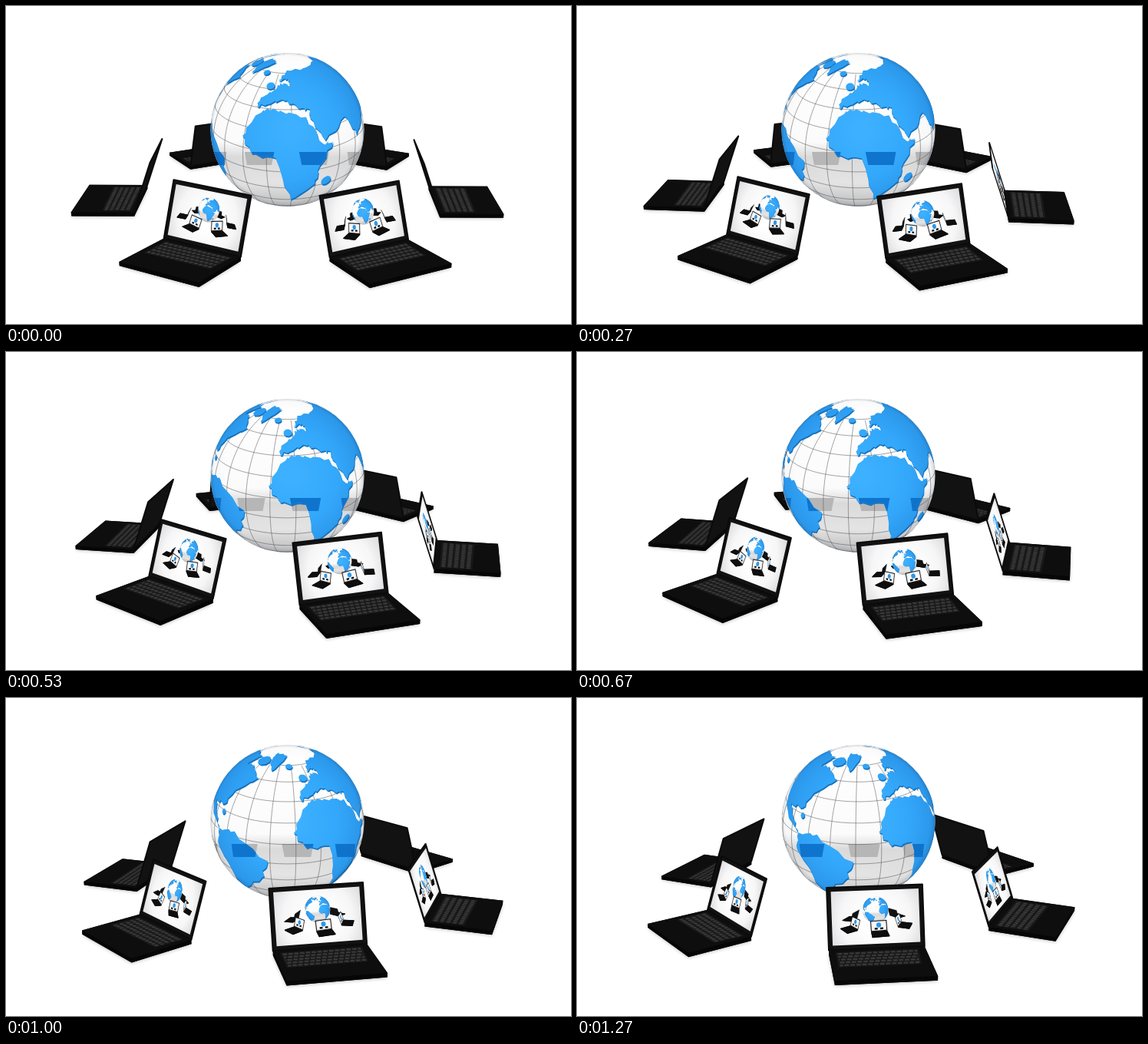
These frames come from a looping animation (736 px wide and 414 px high, 1310 ms). An HTML page with a canvas:

```html
<!DOCTYPE html>
<html lang="en">
<head>
<meta charset="utf-8">
<title>Globe and laptops</title>
<style>
html, body { margin: 0; width: 100%; height: 100%; overflow: hidden; background: #fff; }
canvas { display: block; }
</style>
</head>
<body>
<canvas id="stage" width="736" height="414"></canvas>
<script>
const ctx = document.getElementById('stage').getContext('2d');
const LOOP = 1310, FRAMES = 39, RAD = Math.PI / 180;
const { sin, cos } = Math;

// Globe: screen centre, radius, tilt and perspective bulge
const GX = 366.5, GY = 161, GR = 100, TILT = 23 * RAD, BULGE = 0.1;
// Ring of laptops, seen by a raised perspective camera
const RING = 191, GROUND = 251, DISTANCE = 1200, RISE = 19.6 * RAD;
// Laptop: half width, lid height, base depth, thickness, lean of the lid
const HALF = 53.5, LID = 69, DEPTH = 79, THICK = 5, LEAN = 19.5 * RAD;

// Key points of the coasts as longitude, latitude; roughen() adds the detail
const africa = [-17,15, -9,31, 0,37, 11,36, 32,31, 43,11, 51,11, 40,-5, 38,-20, 20,-37, 9,3, -8,4];
const eurasia = [-10,37, -9,44, 3,51, 8,57, 21,55, 18,61, 5,59, 16,69, 60,70, 140,73, 122,30,
  95,18, 77,8, 67,25, 45,13, 35,30, 36,36, 27,37, 24,40, 12,44, 0,40];
const northAmerica = [-165,66, -90,71, -93,59, -78,61, -56,52, -75,38, -80,26, -97,24, -88,17,
  -80,8, -105,20, -124,45];
const southAmerica = [-79,8, -62,11, -35,-6, -41,-22, -62,-40, -70,-54, -71,-18, -81,-5];
const greenland = [-62,80, -22,78, -43,60, -54,68];
const lands = [africa, eurasia, northAmerica, southAmerica, greenland].map(roughen);
for (const [lon, lat, size] of [[-3,54,3], [-19,65,2.5], [47,-19,4], [-70,68,5], [-78,21,2]]) {
  lands.push(Array.from({ length: 9 }, (_, i) =>
    [lon + size * cos(i * .7) / cos(lat * RAD), lat + size * sin(i * .7)]));
}

function roughen(keys) {
  const points = [], n = keys.length, parts = 5;
  for (let i = 0; i < n; i += 2) {
    for (let j = 0; j < parts; j++) {
      const k = j / parts, wobble = j ? 1.1 : 0, seed = i * 7.3 + j * 2.4;
      points.push([
        keys[i] + (keys[(i + 2) % n] - keys[i]) * k + wobble * sin(seed),
        keys[i + 1] + (keys[(i + 3) % n] - keys[i + 1]) * k + wobble * cos(seed * 1.7)]);
    }
  }
  return points;
}

function addPath(points, close = true) {
  points.forEach(([x, y], i) => i ? ctx.lineTo(x, y) : ctx.moveTo(x, y));
  if (close) ctx.closePath();
}

function trace(points, close) {
  ctx.beginPath();
  addPath(points, close);
}

function fill(points, style) {
  trace(points);
  ctx.fillStyle = style;
  ctx.fill();
}

function gradient(g, ...stops) {
  stops.forEach(([at, color]) => g.addColorStop(at, color));
  return g;
}

// Point on the globe; `front` tells whether it faces the viewer
function onGlobe(lon, lat) {
  const a = lon * RAD, b = lat * RAD, toward = cos(b) * cos(a);
  const x = cos(b) * sin(a);
  const y = sin(b) * cos(TILT) - toward * sin(TILT);
  const z = sin(b) * sin(TILT) + toward * cos(TILT);
  const r = GR * (z > 0 ? 1 + BULGE * z : 1 / Math.hypot(x, y));
  return Object.assign([GX + r * x, GY - r * y], { front: z > 0 });
}

function drawGraticule(centre) {
  const line = at => {
    let run = [];
    const flush = () => { trace(run, false); ctx.stroke(); run = []; };
    for (let i = 0; i <= 60; i++) {
      const p = at(i / 60);
      if (p.front) run.push(p); else flush();
    }
    flush();
  };
  ctx.strokeStyle = 'rgba(80,80,80,.65)';
  ctx.lineWidth = 0.8;
  for (let lon = 2.5; lon < 360; lon += 18) line(k => onGlobe(lon - centre, k * 145 - 80));
  for (let lat = -66.2; lat < 70; lat += 14.7) line(k => onGlobe(k * 360 - 180, lat));
}

// Laptops mirrored in the glossy surface
function drawReflections(ringTurn, style) {
  for (let k = -2; k < 3; k++) {
    const a = 0.71 * (ringTurn + 60 * k);
    const x = offset => GX + GR * sin(Math.max(-90, Math.min(90, a + offset)) * RAD);
    fill([[x(-12), 190], [x(12), 190], [x(10), 207], [x(-10), 207]], style);
  }
}

function drawGlobe(centre, ringTurn, depth) {
  ctx.save();
  ctx.beginPath();
  ctx.arc(GX, GY, GR, 0, 7);
  ctx.fillStyle = gradient(ctx.createLinearGradient(0, GY - GR, 0, GY + GR),
    [0, '#fff'], [.58, '#fbfbfb'], [.68, '#dadada'], [.85, '#e4e4e4'], [1, '#c0c0c0']);
  ctx.fill();
  ctx.clip();
  if (!depth) {
    drawReflections(ringTurn, '#b6b6b6');
    drawGraticule(centre);
  }

  const shapes = lands
    .map(land => land.map(([lon, lat]) => onGlobe(lon - centre, lat)))
    .filter(shape => shape.some(p => p.front));
  for (const shape of shapes) fill(shape.map(([x, y]) => [x + .8, y + 1.8]), '#1672bd');
  ctx.beginPath();
  shapes.forEach(shape => addPath(shape));
  ctx.fillStyle = gradient(ctx.createRadialGradient(GX + 5, GY, 10, GX, GY, GR),
    [0, '#3db1ff'], [.6, '#33a7fa'], [1, '#2b98ec']);
  ctx.fill();
  if (!depth) {
    ctx.save();
    ctx.clip();
    drawReflections(ringTurn, '#0f74cd');
    ctx.restore();
  }
  ctx.fillStyle = gradient(ctx.createRadialGradient(GX - 6, GY - 8, GR * .75, GX, GY, GR),
    [0, 'rgba(0,20,50,0)'], [.8, 'rgba(0,20,50,.02)'], [1, 'rgba(0,20,50,.16)']);
  ctx.fillRect(GX - GR, GY - GR, GR * 2, GR * 2);
  ctx.restore();
}

// Point of a laptop: along its hinge, outwards from the ring, and up
function project(angle, along, out, up) {
  const r = RING + out;
  const x = r * sin(angle) + along * cos(angle);
  const z = r * cos(angle) - along * sin(angle);
  const s = DISTANCE / (DISTANCE - z * cos(RISE) - up * sin(RISE));
  return [GX + x * s, GROUND - (up * cos(RISE) - z * sin(RISE)) * s];
}

// Lay a w by h drawing onto the plane spanned by three corners
function mapPlane([x0, y0], [x1, y1], [x2, y2], w, h) {
  ctx.transform((x1 - x0) / w, (y1 - y0) / w, (x2 - x0) / h, (y2 - y0) / h, x0, y0);
}

function quad(at, left, top, right, bottom) {
  return [at(left, top), at(right, top), at(right, bottom), at(left, bottom)];
}

function drawBase(angle, depth) {
  const plate = up => quad((u, v) => project(angle, u, v, up), -HALF, 0, HALF, DEPTH);
  const top = plate(0), under = plate(-THICK);
  ctx.save();
  if (!depth) {
    ctx.shadowColor = 'rgba(0,0,0,.25)';
    ctx.shadowBlur = 4;
    ctx.shadowOffsetY = 1;
  }
  fill(under, '#060606');
  ctx.restore();
  for (let i = 0; i < 4; i++) {
    const j = (i + 1) % 4;
    fill([top[i], top[j], under[j], under[i]], '#060606');
  }
  fill(top, '#0e0e0e');
  if (depth) return;
  ctx.save();
  mapPlane(top[0], top[1], top[3], 2 * HALF, DEPTH);
  ctx.fillStyle = '#181818';
  ctx.fillRect(7, 6, 93, 39);
  ctx.strokeStyle = '#383838';
  ctx.lineWidth = 4.6;
  ctx.setLineDash([5, 1.6]);
  for (let row = 0; row < 5; row++) {
    ctx.lineDashOffset = row * 2;
    ctx.beginPath();
    ctx.moveTo(9, 10.5 + row * 7.4);
    ctx.lineTo(98, 10.5 + row * 7.4);
    ctx.stroke();
  }
  ctx.restore();
}

function drawLid(angle, ringTurn, centre, depth) {
  const at = (u, v) => project(angle, u, (v - LID) * sin(LEAN), (LID - v) * cos(LEAN));
  const lid = quad(at, -HALF, 0, HALF, LID);
  fill(lid, '#121212');
  ctx.strokeStyle = '#0a0a0a';
  ctx.lineWidth = 2;
  ctx.lineJoin = 'round';
  ctx.stroke();

  const [a, b, , d] = lid;
  const facing = (b[0] - a[0]) * (d[1] - a[1]) - (b[1] - a[1]) * (d[0] - a[0]);
  if (facing < 150) return;
  ctx.save();
  trace(quad(at, 4.5 - HALF, 4.5, HALF - 4.5, LID - 5));
  ctx.clip();
  mapPlane(a, b, d, 2 * HALF, LID);
  ctx.fillStyle = gradient(ctx.createRadialGradient(HALF, 36, 15, HALF, 36, 64),
    [0, '#fff'], [.5, '#f6f6f7'], [1, '#d4d4d7']);
  ctx.fillRect(-5, -5, 2 * HALF + 10, LID + 10);
  if (depth) {
    ctx.fillStyle = '#2b97ea';
    ctx.beginPath();
    ctx.arc(HALF, 28, 16, 0, 7);
    ctx.fill();
    ctx.fillStyle = '#111';
    for (const x of [25, 62]) ctx.fillRect(x, 45, 20, 12);
  } else {
    ctx.translate(HALF, 26);
    ctx.scale(.145, .145);
    ctx.translate(-GX, -GY);
    drawScene(ringTurn, centre, 1);
  }
  ctx.restore();
}

function drawLaptop(angle, ringTurn, centre, depth) {
  const base = () => drawBase(angle, depth);
  const lid = () => drawLid(angle, ringTurn, centre, depth);
  for (const part of cos(angle) > 0 ? [lid, base] : [base, lid]) part();
}

function drawScene(ringTurn, centre, depth = 0) {
  const angles = [0, 1, 2, 3, 4, 5].map(k => (ringTurn + 60 * k) * RAD)
    .sort((a, b) => cos(a) - cos(b));
  const laptops = list => list.forEach(a => drawLaptop(a, ringTurn, centre, depth));
  laptops(angles.filter(a => cos(a) < -.1));
  drawGlobe(centre, ringTurn, depth);
  laptops(angles.filter(a => cos(a) >= -.1));
}

function tick() {
  const time = performance.now() % LOOP;
  const step = Math.min(FRAMES - 1, Math.floor((time + 4) / 33.334));
  ctx.fillStyle = '#fff';
  ctx.fillRect(0, 0, 736, 414);
  drawScene(29.3 - step * 0.608, 17 - step * 1.28);
  requestAnimationFrame(tick);
}
tick();
</script>
</body>
</html>
```
